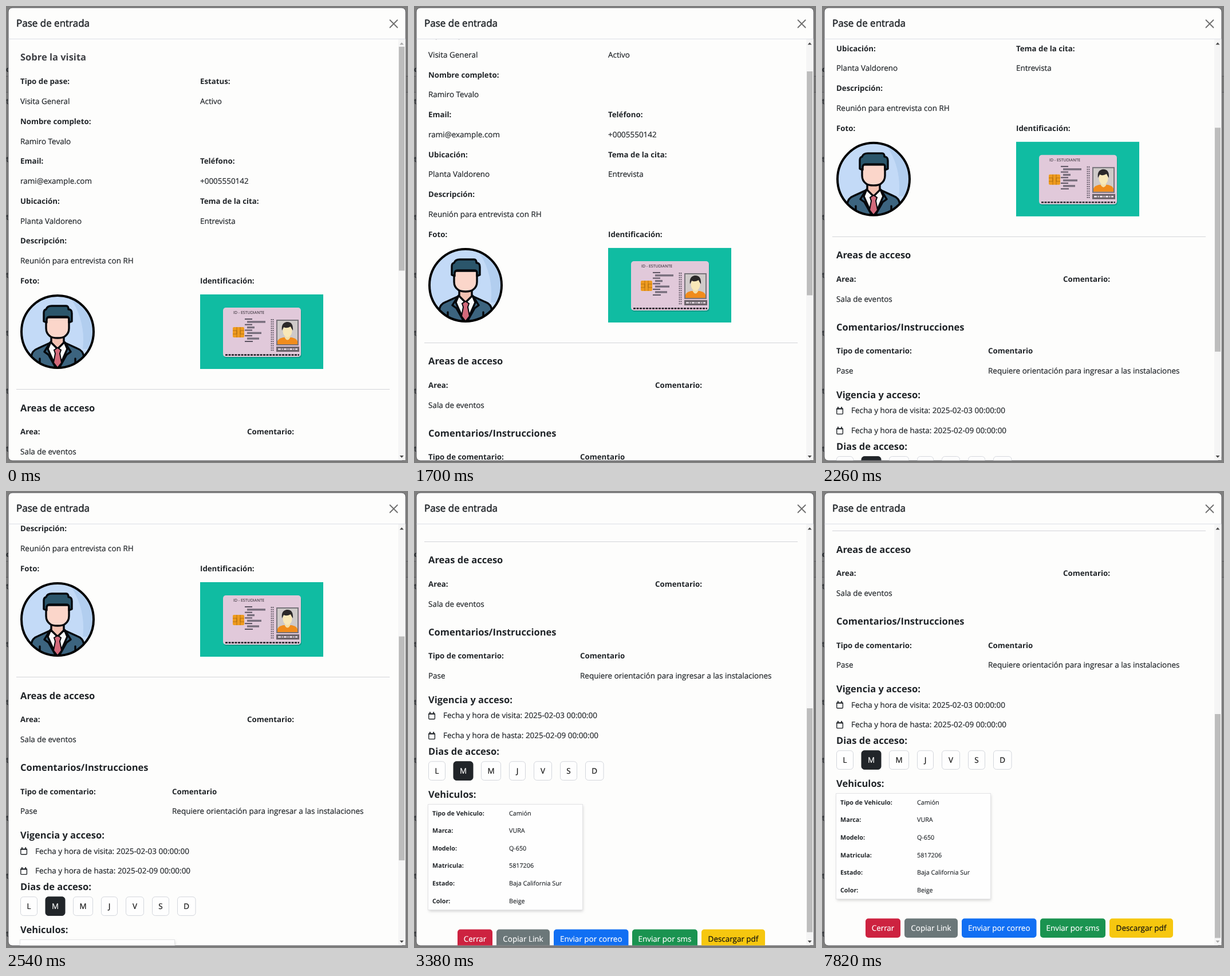
An HTML page that plays this animation: 702x797 px, repeating every 8000 ms.

```html
<!DOCTYPE html>
<html lang="es">
<head>
<meta charset="utf-8">
<title>Pase de entrada</title>
<style>
html, body { margin: 0; width: 100%; height: 100%; overflow: hidden; background: #7f7f7f; }
svg { display: block; width: 100vw; height: 100vh; }
text { font-family: "Open Sans", "Noto Sans", sans-serif; fill: #212529; text-rendering: geometricPrecision; }
.title { font-size: 17px; stroke: #212529; stroke-width: .5px; }
.head { font-size: 16.5px; font-weight: 700; }
.label { font-size: 13.25px; font-weight: 700; }
.body { font-size: 13.48px; stroke: #212529; stroke-width: .2px; }
.cellLabel { font-size: 10.75px; font-weight: 700; }
.cell { font-size: 10.75px; stroke: #212529; stroke-width: .15px; }
.btn { font-size: 13.45px; text-anchor: middle; stroke-width: .2px; }
.tiny { font-size: 7px; }
</style>
</head>
<body>
<svg id="stage" viewBox="0 0 702 797">
  <defs>
    <clipPath id="view"><rect x="4" y="58" width="681" height="734.5"/></clipPath>
    <clipPath id="disc"><circle r="63"/></clipPath>
    <filter id="soft" x="-10%" y="-10%" width="120%" height="125%"><feGaussianBlur stdDeviation="2.5"/></filter>
  </defs>
  <g id="page"></g>
  <rect x="4" y="3" width="694" height="790" rx="7" fill="#fdfdfc" stroke="#5d5d60"/>
  <text class="title" x="18" y="36.2">Pase de entrada</text>
  <path d="M670.5 24.5l13 13m0 -13l-13 13" stroke="#6e6e6e" stroke-width="1.8" stroke-linecap="round"/>
  <path d="M4.5 57.5H697.5" stroke="#dcdfe6"/>
  <g clip-path="url(#view)"><g id="content"></g></g>
  <rect x="685" y="58" width="12.5" height="734" fill="#f5f5f5"/>
  <rect id="thumb" x="686" y="71" width="10" height="390.5" fill="#bdbdbd"/>
  <path id="up" d="M687.5 67.5l3.5 -4l3.5 4z"/>
  <path id="down" d="M687.5 784l3.5 4l3.5 -4z"/>
</svg>
<script>
const $ = id => document.getElementById(id);
const LOOP = 8000, MAX_SCROLL = 599, THUMB_TRAVEL = 318;

const rect = (x, y, w, h, fill, extra = '') =>
  `<rect x="${x}" y="${y}" width="${w}" height="${h}" fill="${fill}" ${extra}/>`;
const path = (d, fill = 'none', extra = '') => `<path d="${d}" fill="${fill}" ${extra}/>`;
// y is the middle of the capitals
const text = (cls, x, y, str, fill = '#212529') => {
  const drop = { head: 6, cell: 3.9, cellLabel: 3.9, tiny: 2.5 }[cls] || 4.8;
  const stroke = cls === 'btn' ? `;stroke:${fill}` : '';
  return `<text class="${cls}" x="${x}" y="${y + drop}" style="fill:${fill}${stroke}">${str}</text>`;
};

function details() {
  const rows = [
    ['Tipo de pase:', 'Estatus:'], ['Visita General', 'Activo'],
    ['Nombre completo:'], ['Ramiro Tevalo'],
    ['Email:', 'Teléfono:'], ['rami@example.com', '+0005550142'],
    ['Ubicación:', 'Tema de la cita:'], ['Planta Valdoreno', 'Entrevista'],
    ['Descripción:'], ['Reunión para entrevista con RH'],
    ['Foto:', 'Identificación:']
  ];
  return text('head', 25, 89.3, 'Sobre la visita', '#3f4146') + rows.map((row, i) =>
    row.map((str, j) => text(i % 2 ? 'body' : 'label', j ? 339 : 25, 131.5 + 34.75 * i, str)).join('')
  ).join('');
}

function avatar() {
  const ink = 'stroke="#05080c" stroke-width="3.4" stroke-linejoin="round" stroke-linecap="round"';
  return `<g transform="translate(90 568)"><circle r="63" fill="#c3daf7"/><g clip-path="url(#disc)">`
    + path('M20 -63Q50 -20 44 30L70 30V-63Z', '#b2ceef')
    + path('M-11 5V22L0 32L11 22V5Z', '#f3c1b1', ink)
    + path('M-46 70V44Q-45 33 -34 29L-12 19L0 31L12 19L34 29Q45 33 46 44V70Z', '#3c647f', ink)
    + path('M-12 18L0 30L12 18L17 30L2 64H-2L-17 30Z', '#fbfbfb', ink)
    + path('M-6 32L0 28L6 32L4 38L7 54L0 63L-7 54L-4 38Z', '#d3697a', 'stroke="#05080c" stroke-width="2"')
    + path('M-13 19L-23 35L-16 40L-3 63M13 19L23 35L16 40L3 63M-31 47V63M31 47V63', 'none', ink)
    + path('M-20 -25V-6Q-20 3 -13 8Q-9 11 0 11Q9 11 13 8Q20 3 20 -6V-25Z', '#fbd6ca', ink)
    + path('M-24 -18V-33Q-24 -38 -20 -39Q-18 -45 -10 -45H15Q19 -45 19 -39Q25 -39 25 -32V-18L20 -16V-22Q20 -26 15 -26H-14Q-19 -26 -19 -20V-16Z', '#2b566b', ink)
    + `</g><circle r="63" fill="none" stroke="#000" stroke-width="4"/></g>`;
}

function idCard() {
  let s = rect(339, 503, 215, 130, '#10bca2')
    + rect(380, 528, 136, 86, '#0b9d89', 'rx="5"')
    + rect(379, 526, 136, 86, '#e1c9da', 'rx="5"')
    + text('tiny', 397, 534.3, 'ID - ESTUDIANTE', '#1d181f')
    + rect(396, 560, 20, 18, '#ee9b1f', 'rx="2"')
    + path('M396 566h7v6h-7M416 566h-7v6h7M403 560v18M409 560v18', 'none', 'stroke="#a8690f" stroke-width=".8"');
  [32, 13, 25, 21].forEach((w, i) => {
    const y = 545 + 9.7 * i;
    s += rect(417, y, 13, 2, '#5c5462') + rect(421, y + 4.2, w, 3.4, '#776e7c');
  });
  s += rect(417, 584, 14, 2, '#5c5462')
    + path('M463.5 546V603M466.5 546V603', 'none', 'stroke="#4a4350" stroke-width="1.6" stroke-dasharray="2 1.8"')
    + path('M383 608.5H512', 'none', 'stroke="#1d1a20" stroke-width="2.4" stroke-dasharray="4 1.5"')
    + rect(472, 547, 39, 45, '#77737a') + rect(474, 549, 35, 41, '#cfcac9')
    + path('M474 590V585Q475 580 484 578H499Q508 580 509 585V590Z', '#f08c1c')
    + path('M487 573H496V579Q491.5 586 487 579Z', '#f3dfa9')
    + `<ellipse cx="491.5" cy="567" rx="8" ry="10.5" fill="#f8e8b8"/>`
    + path('M482 566Q480 553 490 551Q502 550 501 566Q498 562 497 559Q490 563 485 560Z', '#2b2829')
    + rect(472, 594, 40, 9, '#6a6269')
    + path('M475 598.5H509', 'none', 'stroke="#e6dce4" stroke-width="2.6" stroke-dasharray="5 1.5 2 1.5"');
  return s;
}

function access() {
  const date = (y, str) =>
    rect(25.8, y - 3.3, 10.6, 9.4, 'none', 'rx="1.2" stroke="#212529" stroke-width="1.4"')
    + path(`M25.2 ${y - 3}h11.8M28 ${y - 6.5}v3M34.2 ${y - 6.5}v3`, 'none', 'stroke="#212529" stroke-width="1.9"')
    + text('body', 51, y, str);
  const days = [['L', 25, 30], ['M', 68.5, 35], ['M', 117, 35], ['J', 166, 29], ['V', 209, 32], ['S', 255, 30], ['D', 299, 32.5]];
  return path('M18 668.5H670', 'none', 'stroke="#d3d4d8"')
    + text('head', 25, 700.5, 'Areas de acceso')
    + text('label', 25, 742.5, 'Area:') + text('label', 421, 742.5, 'Comentario:')
    + text('body', 25, 777.2, 'Sala de eventos')
    + text('head', 25, 826, 'Comentarios/Instrucciones')
    + text('label', 25, 867.7, 'Tipo de comentario:') + text('label', 290, 867.7, 'Comentario')
    + text('body', 25, 902.6, 'Pase')
    + text('body', 290, 902.6, 'Requiere orientación para ingresar a las instalaciones')
    + text('head', 25, 943.7, 'Vigencia y acceso:')
    + date(971.7, 'Fecha y hora de visita: 2025-02-03 00:00:00')
    + date(1006.5, 'Fecha y hora de hasta: 2025-02-09 00:00:00')
    + text('head', 25, 1034, 'Dias de acceso:')
    + days.map(([d, x, w], i) =>
        rect(x + .5, 1051.8, w - 1, 32.6, i === 1 ? '#212529' : '#fefefe', `rx="5" stroke="${i === 1 ? '#212529' : '#d3d6dc'}"`)
        + text('btn', x + w / 2, 1068.2, d, i === 1 ? '#fff' : '#111')).join('');
}

function vehicle() {
  const cells = [['Tipo de Vehiculo:', 'Camión'], ['Marca:', 'VURA'], ['Modelo:', 'Q-650'],
    ['Matricula:', '5817206'], ['Estado:', 'Baja California Sur'], ['Color:', 'Beige']];
  return text('head', 25, 1108.7, 'Vehiculos:')
    + rect(26, 1129, 269, 184, '#d2d2d2', 'filter="url(#soft)"')
    + rect(24.5, 1126.5, 270, 184, '#fefefe', 'stroke="#e3e3e5"')
    + cells.map(([a, b], i) => {
        const y = 1141.8 + 30.6 * i;
        return text('cellLabel', 32, y, a) + text('cell', 166, y, b);
      }).join('');
}

function actions() {
  return [['Cerrar', 76, 61, '#cd2240'], ['Copiar Link', 144, 93, '#6b7779'],
    ['Enviar por correo', 244, 130.5, '#116ff3'], ['Enviar por sms', 381, 114, '#1a9350'],
    ['Descargar pdf', 502, 111, '#f6c70f']].map(([str, x, w, fill], i) =>
      rect(x, 1344.5, w, 33.5, fill, 'rx="5"') + text('btn', x + w / 2, 1361.3, str, i === 4 ? '#111' : '#fff')
  ).join('');
}

function backdrop() {
  let s = rect(0, 0, 702, 797, '#7f7f7f') + rect(0, 122, 702, 28, '#787878')
    + path('M0 122.5H702M0 150.5H702', 'none', 'stroke="#5f5f62"')
    + text('label', -4, 110, 'ic');
  for (let y = 166; y < 797; y += 101) s += text('body', -8, y, 'nt');
  return s;
}

$('page').innerHTML = backdrop();
$('content').innerHTML = details() + avatar() + idCard() + access() + vehicle() + actions();

// time, scroll, speed
const keys = [[1420, 1.8, .1], [1980, 188.3, .3], [2540, 344, .3], [2940, 475, .3], [3620, MAX_SCROLL, 0]];

function scrollAt(t) {
  if (t < keys[0][0]) return 0;
  // the screen refreshes after 120, 120 and 40 ms in turn
  const since = t - 1420, part = since % 280;
  const time = Math.min(1420 + since - part + (part >= 240 ? 240 : part >= 120 ? 120 : 0), 3620);
  const i = Math.max(1, keys.findIndex(k => time <= k[0]));
  const [t0, a, va] = keys[i - 1], [t1, b, vb] = keys[i];
  const d = t1 - t0, u = (time - t0) / d, w = 1 - u;
  return a * w * w * (1 + 2 * u) + b * u * u * (1 + 2 * w) + d * u * w * (va * w - vb * u);
}

function draw(t) {
  const s = scrollAt(t);
  $('content').setAttribute('transform', `translate(0 ${-s})`);
  $('thumb').setAttribute('y', 71 + s / MAX_SCROLL * THUMB_TRAVEL);
  $('up').setAttribute('fill', s > 0 ? '#4a4a4a' : '#a9a9a9');
  $('down').setAttribute('fill', s < MAX_SCROLL ? '#4a4a4a' : '#a9a9a9');
}

const start = performance.now();
function tick() {
  draw((performance.now() - start) % LOOP);
  requestAnimationFrame(tick);
}
tick();
</script>
</body>
</html>
```
